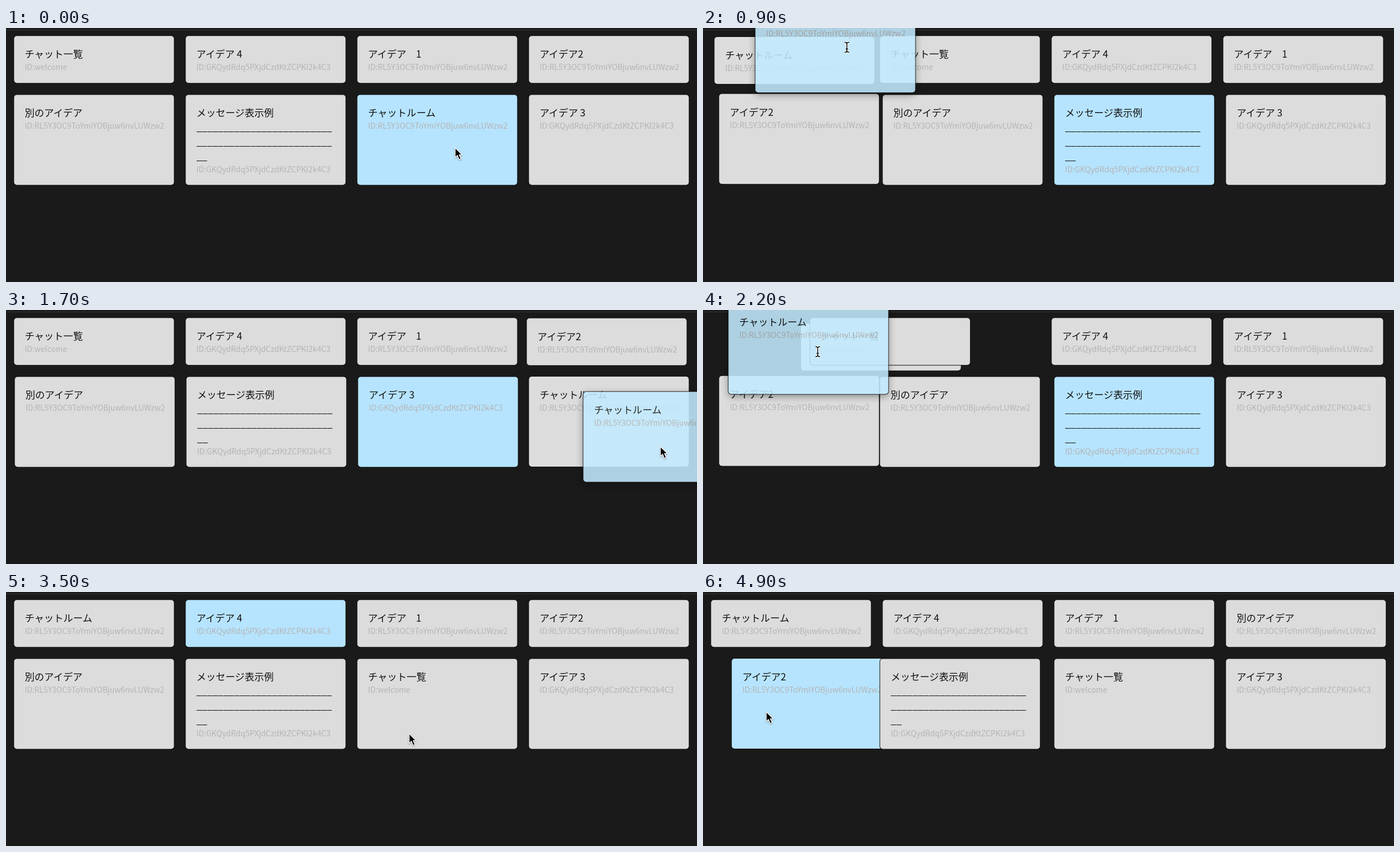
Recreate the animation shown at these times as an HTML page. Size 1232 px wide and 454 px high, loop 5000 ms.

```html
<!DOCTYPE html>
<html lang="ja">
<head>
<meta charset="utf-8">
<title>カードの並べ替え</title>
<style>
  html, body { margin: 0; width: 100%; height: 100%; overflow: hidden; background: #1a1a1a; }
  #stage {
    position: relative; width: 1232px; height: 454px; overflow: hidden;
    background: #1a1a1a; color: #111;
    font: 17.3px/26px "Noto Sans CJK JP", "Noto Sans CJK", sans-serif;
  }
  #rule { position: absolute; top: 3px; width: 100%; height: 1px; background: #363636; }
  .card {
    position: absolute; left: 0; top: 0; width: 285px; box-sizing: border-box;
    padding: 18.7px 19px; border-radius: 5px; white-space: nowrap;
    background: #dcdcdc; box-shadow: 0 0 0 1px #0c0c0c;
  }
  .card small { display: block; font-size: 13.84px; line-height: 20.8px; color: #b4b4b4; }
  .card.hover { background: #b6e4ff; }
  #ghost {
    z-index: 20; opacity: .88; background: #c2ebff;
    box-shadow: 0 0 0 1px #0c0c0c, 0 4px 14px rgba(0, 0, 0, .45);
  }
  .cursor { position: absolute; left: 0; top: 0; z-index: 30; overflow: visible; }
  #arrow { filter: drop-shadow(0 1px 1px rgba(0, 0, 0, .4)); }
  #beam path { stroke: #000; stroke-width: 1.5; }
  #beam path:first-child { stroke: #fff; stroke-width: 3.6; }
</style>
</head>
<body>
<div id="stage">
  <div id="rule"></div>
  <div id="ghost" class="card"></div>
  <svg id="arrow" class="cursor" width="16" height="26">
    <path d="M.8 1V18.6L4.8 14.9L7.9 22.2L11.2 20.8L8.1 13.7H13.4Z" stroke="#fff" stroke-width="1.3"/>
  </svg>
  <svg id="beam" class="cursor" width="1" height="1" fill="none">
    <path d="M-4 -9Q0 -9 0 -6Q0 -9 4 -9M0 -6V6M-4 9Q0 9 0 6Q0 9 4 9M-2 3H2"/>
    <path d="M-4 -9Q0 -9 0 -6Q0 -9 4 -9M0 -6V6M-4 9Q0 9 0 6Q0 9 4 9M-2 3H2"/>
  </svg>
</div>
<script>
const LOOP = 5000, STEP = 100, SLIDE = 200, LAG = 50;
const ID_A = 'RL5Y3OC9ToYmiYOBjuw6nvLUWzw2';
const ID_B = 'GKQydRdq5PXjdCzdKtZCPKI2k4C3';
const line = n => '<br>' + '_'.repeat(n);

const CARDS = {
  list: ['チャット一覧', 'welcome'],
  idea4: ['アイデア 4', ID_B],
  idea1: ['アイデア\u30001', ID_A],
  idea2: ['アイデア2', ID_A],
  other: ['別のアイデア', ID_A],
  sample: ['メッセージ表示例' + line(25) + line(25) + line(2), ID_B],
  room: ['チャットルーム', ID_A],
  idea3: ['アイデア 3', ID_B]
};
const ORDER = Object.keys(CARDS);

// Each drag: card, first slot, grab point, times, and its moves [time, slot, delay of the card itself].
// The highlight sticks to the first slot until "release".
const DRAGS = [
  { key: 'room', slot: 6, grabX: 163, grabY: 80, start: 300, drop: 2400, release: 2500,
    moves: [[660, 5], [700, 4], [725, 0], [1100, 1], [1220, 2], [1335, 3], [1513, 7],
            [1940, 6], [1990, 5], [2025, 1], [2130, 0]] },
  { key: 'list', slot: 1, grabX: 96, grabY: 35, start: 2900, drop: 3400, release: 3600,
    moves: [[3060, 5], [3180, 6]] },
  { key: 'idea2', slot: 3, grabX: 119, grabY: 15, start: 4300, drop: 4900, release: 4900,
    moves: [[4339, 2], [4478, 1], [4560, 5], [4725, 4, 44]] }
];

// Pointer path: time, x, y
const PATH = [
  [0, 800, 213], [100, 789, 199], [250, 789, 199], [660, 500, 170], [700, 290, 130],
  [850, 256, 34], [900, 256, 34], [1350, 1000, 94], [1600, 1218, 209], [1700, 1166, 243],
  [1800, 1130, 266], [1940, 880, 200], [1990, 590, 150], [2150, 208, 69], [2200, 204, 74],
  [2400, 215, 60], [2600, 424, 45], [2700, 416, 49], [2850, 416, 49], [3280, 712, 250],
  [3500, 718, 252], [4000, 1051, 29], [4250, 1051, 29], [4450, 454, 115], [4500, 408, 123],
  [4725, 290, 190], [4850, 112, 213], [LOOP, 112, 213]
];

const slotX = s => 14.4 + 306 * (s % 4);
const slotY = s => s < 4 ? 14.3 : 119.4;
const slotH = s => s < 4 ? 83.7 : 161.2;
const place = (el, x, y) => { el.style.transform = `translate(${x}px, ${y}px)`; };
const markup = key => `${CARDS[key][0]}<small>ID:${CARDS[key][1]}</small>`;
const byId = id => document.getElementById(id);

const ghost = byId('ghost'), arrow = byId('arrow'), beam = byId('beam');
const els = {};
for (const key of ORDER) {
  els[key] = document.createElement('div');
  els[key].className = 'card';
  els[key].innerHTML = markup(key);
  byId('stage').insertBefore(els[key], ghost);
}

function pointer(t) {
  const i = Math.max(1, PATH.findIndex(p => p[0] >= t));
  const [t0, x0, y0] = PATH[i - 1], [t1, x1, y1] = PATH[i];
  const k = (t - t0) / (t1 - t0);
  return [x0 + (x1 - x0) * k, y0 + (y1 - y0) * k];
}

function cardAt(c, t) {
  const p = Math.min(1, Math.max(0, (t - c.start) / SLIDE));
  const left = (1 - p) ** 2;
  const x = slotX(c.slot), y = slotY(c.slot);
  return [x + (c.x - x) * left, y + (c.y - y) * left];
}

// Replays every reorder up to t; a card sent to a new slot slides from where it is.
function layout(t) {
  const order = [...ORDER], state = {};
  order.forEach((key, s) => { state[key] = { x: slotX(s), y: slotY(s), slot: s, start: -SLIDE }; });
  for (const { key, moves } of DRAGS) {
    for (const [at, to, delay = 0] of moves) {
      if (at > t) return state;
      order.splice(order.indexOf(key), 1);
      order.splice(to, 0, key);
      order.forEach((k, s) => {
        if (state[k].slot === s) return;
        const [x, y] = cardAt(state[k], at);
        state[k] = { x, y, slot: s, start: at + (k === key ? delay : 0) };
      });
    }
  }
  return state;
}

const inSlot = (s, x, y) =>
  x >= slotX(s) && x <= slotX(s) + 285 && y >= slotY(s) && y <= slotY(s) + slotH(s);

function draw(t) {
  const [px, py] = pointer(t);
  const stuck = DRAGS.find(d => t >= d.start && t < d.release);
  const drag = stuck && t < stuck.drop ? stuck : null;
  const state = layout(t);

  for (const key of ORDER) {
    const c = state[key], el = els[key];
    place(el, ...cardAt(c, t));
    el.style.height = slotH(c.slot) + 'px';
    el.style.zIndex = c.slot + 1;
    el.classList.toggle('hover', stuck ? c.slot === stuck.slot : inSlot(c.slot, px, py));
  }

  ghost.style.display = drag ? '' : 'none';
  if (drag) {
    if (ghost.dataset.key !== drag.key) {
      ghost.dataset.key = drag.key;
      ghost.innerHTML = markup(drag.key);
      ghost.style.height = slotH(drag.slot) + 'px';
    }
    const [gx, gy] = pointer(t - LAG);
    place(ghost, gx - drag.grabX + .4, gy - drag.grabY + .3);
  }

  const overText = drag && py > 30 && py < 85;
  arrow.style.display = overText ? 'none' : '';
  beam.style.display = overText ? '' : 'none';
  if (overText) place(beam, px + .5, py + .5);
  else place(arrow, px, py);
}

const begin = performance.now();
function tick() {
  const t = (performance.now() - begin) % LOOP;
  draw(Math.floor(t / STEP) * STEP);
  requestAnimationFrame(tick);
}
tick();
</script>
</body>
</html>
```
